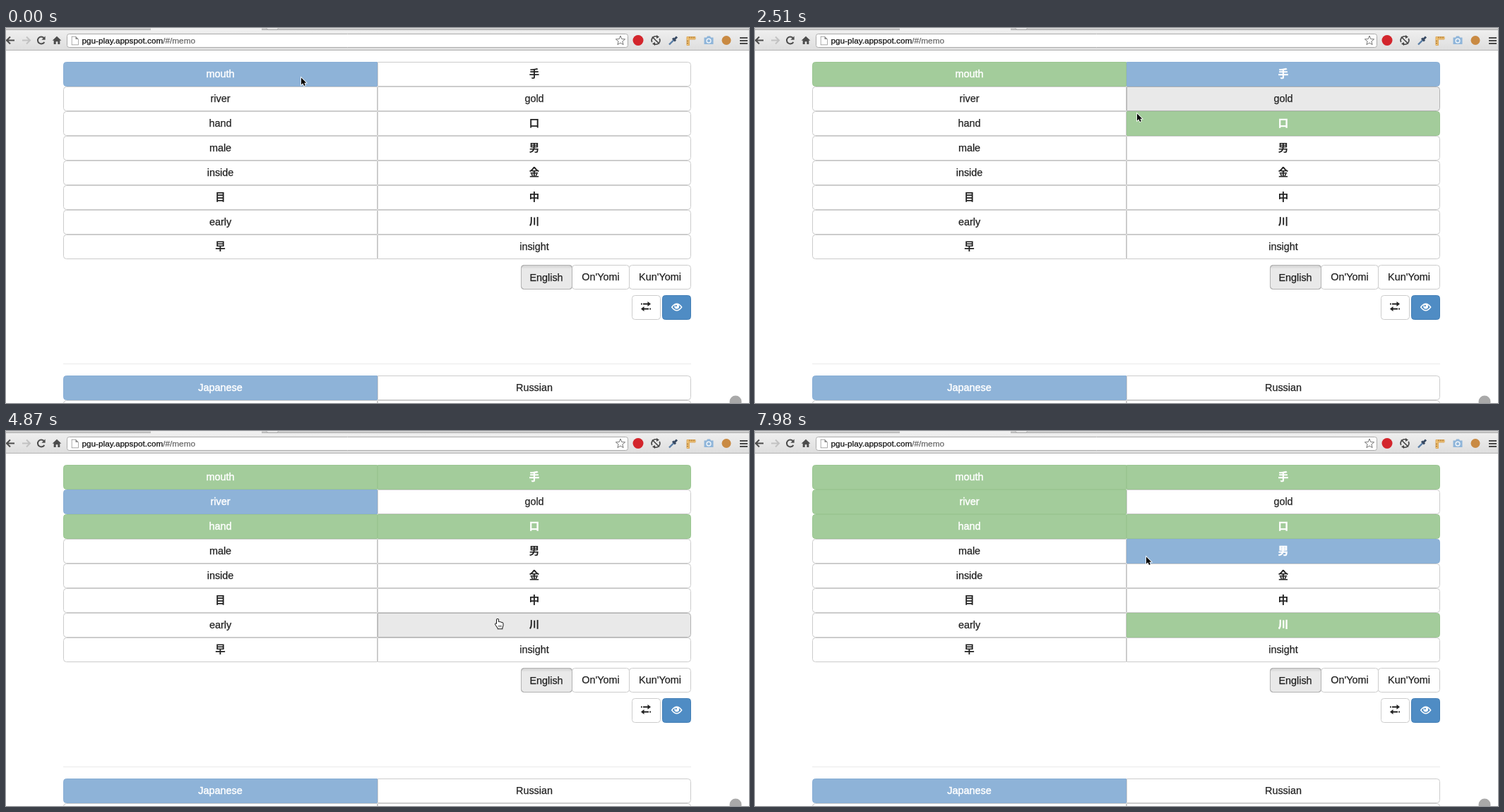
Recreate the animation shown at these times as an HTML page with a canvas. Size 1052 px wide and 532 px high, loop 8000 ms.

```html
<!DOCTYPE html>
<html lang="en">
<head>
<meta charset="utf-8">
<title>Memo</title>
<style>
html, body { margin: 0; width: 100%; height: 100%; overflow: hidden; background: #fff; }
canvas { display: block; width: 1052px; height: 532px; }
</style>
</head>
<body>
<canvas id="stage" width="1052" height="532"></canvas>
<script>
const ctx = document.getElementById('stage').getContext('2d');
const LOOP = 8000;
const SANS = '14.4px "Liberation Sans", Arial, sans-serif';
const KANJI = 'bold 14.4px "Noto Sans CJK JP", "Noto Sans CJK", sans-serif';
const INK = '#222';

// Cells 0-7 are the left column, 8-15 the right one.
const words = ['mouth', 'river', 'hand', 'male', 'inside', '目', 'early', '早',
               '手', 'gold', '口', '男', '金', '中', '川', 'insight'];
const pickedAt = { 0: 0, 8: 2210, 1: 4290, 11: 7550 };
const matchedAt = { 0: 880, 10: 880, 8: 3400, 2: 3400, 1: 5470, 14: 5470 };

// time, x, y, pointer shape, hovered cell
const moves = [
  [0, 418, 70, 'arrow'], [150, 446, 77, 'arrow'],
  [300, 575, 100, 'hand', 9], [440, 655, 142, 'hand', 10], [590, 674, 133, 'hand', 10],
  [1030, 677, 133, 'arrow'], [1620, 674, 113, 'hand'],
  [1770, 686, 86, 'hand', 9], [1920, 692, 64, 'hand', 8],
  [2360, 640, 92, 'hand', 9], [2510, 541, 121, 'arrow', 9],
  [2660, 498, 129, 'hand', 2], [2800, 466, 136, 'hand', 2], [2950, 452, 140, 'hand', 2],
  [3100, 444, 141, 'hand', 2], [3250, 441, 141, 'hand', 2],
  [3840, 446, 130, 'arrow'], [3990, 447, 111, 'hand', 1], [4140, 446, 104, 'hand', 1],
  [4430, 478, 110, 'arrow'], [4580, 560, 150, 'hand', 11],
  [4720, 650, 215, 'hand', 12], [4870, 692, 266, 'hand', 14],
  [5170, 705, 274, 'hand', 14], [5610, 708, 274, 'arrow'],
  [6060, 680, 254, 'hand', 13], [6210, 632, 237, 'hand', 13],
  [6360, 610, 218, 'hand', 12], [6500, 600, 205, 'hand', 12], [6650, 597, 200, 'hand', 12],
  [7250, 595, 178, 'hand', 11], [7400, 593, 168, 'hand', 11],
  [7690, 590, 169, 'arrow'], [7840, 577, 173, 'arrow'], [7980, 554, 178, 'arrow']
];

const looks = {
  plain: ['#fff', '#ccc', INK],
  hover: ['#e9e9e9', '#b2b2b2', INK],
  blue: ['#8eb3d8', '#8aafd5', '#fff'],
  green: ['#a3cc9b', '#9bc692', '#fff'],
  primary: ['#4f8cc4', '#447fb6', '#fff']
};

// Corner radii for the left and right halves of a pair, and for a lone button.
const LEFT = [4, 0, 0, 4], RIGHT = [0, 4, 4, 0], ALL = 4;

const handPath = new Path2D('M2.6 7V1.7C2.6 .2 4.9 .2 4.9 1.7V5.2C5.3 4.2 7.1 4.4 7.2 5.5' +
  'C7.7 4.7 9.3 5 9.4 6.2C10 5.5 11.6 6 11.6 7.3V9.4C11.6 11.4 10.4 12 10.4 14.4H4.4' +
  'C4.3 12.6 2.3 11.4 .8 8.6C.1 7.2 1.6 6.5 2.6 8.2Z');
const arrowPath = new Path2D('M0 0V11.4L2.7 8.9L4.5 13L6.6 12.1L4.8 8.1H8.2Z');

function box(x, y, w, h, r, fill, stroke) {
  ctx.beginPath();
  ctx.roundRect(x + .5, y + .5, w - 1, h - 1, r);
  ctx.fillStyle = fill;
  ctx.fill();
  ctx.lineWidth = 1;
  ctx.strokeStyle = stroke;
  ctx.stroke();
}

function bar(x, y, w, h, color) {
  ctx.fillStyle = color;
  ctx.fillRect(x, y, w, h);
}

function dot(x, y, r, color) {
  ctx.beginPath();
  ctx.arc(x, y, r, 0, 7);
  ctx.fillStyle = color;
  ctx.fill();
}

function shape(d, x, y, fill, stroke, width = 1, scale = 1) {
  const p = d instanceof Path2D ? d : new Path2D(d);
  ctx.save();
  ctx.translate(x, y);
  ctx.scale(scale, scale);
  ctx.lineWidth = width;
  if (stroke) { ctx.strokeStyle = stroke; ctx.stroke(p); }
  if (fill) { ctx.fillStyle = fill; ctx.fill(p); }
  ctx.restore();
}

// A hairline stroke gives the slightly heavier weight of smoothed type.
function type(text, x, y, color, weight) {
  ctx.fillStyle = ctx.strokeStyle = color;
  ctx.lineWidth = weight;
  ctx.fillText(text, x, y);
  ctx.strokeText(text, x, y);
}

function label(text, x, y, color) {
  const kanji = text.charCodeAt(0) > 255;
  ctx.font = kanji ? KANJI : SANS;
  ctx.textAlign = 'center';
  type(text, x, y, color, color === '#fff' ? .45 : kanji ? .05 : .25);
}

function button(text, x, y, w, look, radii = ALL) {
  const [fill, edge, ink] = looks[look];
  box(x, y, w, 35, radii, fill, edge);
  if (text) label(text, x + w / 2, y + 22, ink);
}

function drawToolbar() {
  const g = ctx.createLinearGradient(0, 3, 0, 31);
  g.addColorStop(0, '#efefef');
  g.addColorStop(1, '#dedede');
  bar(0, 0, 1052, 31, g);
  bar(0, 31, 1052, 1, '#b4b4b4');
  for (const [x, w] of [[0, 205], [362, 690]]) {
    bar(x, 0, w, 2, '#d0d0d0');
    bar(x, 2, w, 1, '#aaa');
  }
  shape('M0 0H19L17 3H4Z', 367, -1, '#e8e8e8', '#999');

  // navigation
  const ink = '#4c4c4c';
  shape('M6 -5L1 0L6 5M1 0H12', 0, 17.5, null, ink, 2);
  shape('M29 -5L34 0L29 5M34 0H23', 0, 17.5, null, '#c2c2c2', 2);
  shape('M4.3 2.4A5 5 0 1 1 3.6 -3.5', 50, 17.5, null, ink, 2);
  shape('M5.6 -6V-.8H.4Z', 50, 17.5, ink);
  shape('M0 -6.5L7 .2H4.8V6H1.5V2H-1.5V6H-4.8V.2H-7Z', 72, 17.5, ink, null, 1, .9);

  // address field
  box(86, 8, 795, 20, 3, '#fff', '#ababab');
  shape('M0 0H5L8.5 3.5V11H0ZM5 0V3.5H8.5', 93.5, 12.5, '#fff', '#888', 1.4);
  ctx.font = '11.75px "Liberation Sans", Arial, sans-serif';
  ctx.textAlign = 'left';
  const host = 'pgu-play.appspot.com';
  type(host, 107.5, 22, '#111', .25);
  type('/#/memo', 107.5 + ctx.measureText(host).width, 22, '#666', .25);

  // star
  ctx.beginPath();
  for (let i = 0; i < 10; i++) {
    const r = i % 2 ? 3 : 7, a = i * Math.PI / 5 - Math.PI / 2;
    ctx.lineTo(870 + r * Math.cos(a), 18 + r * Math.sin(a));
  }
  ctx.closePath();
  ctx.lineWidth = 1;
  ctx.strokeStyle = '#777';
  ctx.stroke();

  // tools
  dot(895, 17.5, 7.5, '#d3252c');
  shape('M-5.2 2.5A5.6 5.6 0 0 1 2 -5.2M5.2 -2.5A5.6 5.6 0 0 1 -2 5.2M-5 -5L5 5',
    920, 17.5, null, '#484848', 1.7);
  shape('M1 -7.5L5 -4.8L1 -2.5ZM-1 7.5L-5 4.8L-1 2.5Z', 920, 17.5, '#484848');
  shape('M-6 6L1.5 -1.5', 945, 17.5, null, '#5b7fa6', 2.4);
  shape('M-1 -3L3 1M1.5 -1.5L5 -5', 945, 17.5, null, '#384a63', 3);
  shape('M-6 -5H6V-1.5H-2.5V7H-6Z', 970, 17.5, '#eabb6d', '#d09a50');
  shape('M-2 -5V-3M1 -5V-3M4 -5V-3M-6 1H-4M-6 4H-4', 970, 17.5, null, '#98652c');
  shape('M-6.5 -4H-3L-2 -6H2L3 -4H6.5V5.5H-6.5Z', 995, 17.5, '#8fb5d9');
  dot(995, 18.2, 3.6, '#eef4fa');
  dot(995, 18.2, 2.1, '#8fb5d9');
  dot(1020, 17.5, 6.5, '#c98a43');
  for (const y of [13, 17, 21]) bar(1039, y, 11, 2, '#4a4a4a');
}

function drawControls() {
  button('', 729, 336, 73, 'hover');
  const g = ctx.createLinearGradient(0, 337, 0, 342);
  g.addColorStop(0, 'rgba(0,0,0,.1)');
  g.addColorStop(1, 'rgba(0,0,0,0)');
  bar(730, 337, 71, 5, g);
  label('English', 765, 359, INK);
  button("On'Yomi", 801, 336, 82, 'plain');
  button("Kun'Yomi", 882, 336, 88, 'plain');
  box(729, 336, 73, 35, ALL, 'transparent', '#b2b2b2');

  button('', 886, 379, 41, 'plain');
  shape('M-4 -3.5H3M-7 -3.5H-5.2M4 3.5H-3M7 3.5H5.2', 906, 395, null, INK, 2);
  shape('M2.5 -7L7 -3.5L2.5 0ZM-2.5 0L-7 3.5L-2.5 7Z', 906, 395, INK);

  button('', 929, 379, 41, 'primary');
  shape('M-7 0Q0 -9.5 7 0Q0 9.5 -7 0Z', 949.7, 396, null, '#fff', 1.4);
  dot(949.7, 395, 3.4, '#fff');
  dot(948.7, 394, 1.2, looks.primary[0]);

  bar(81, 476, 889, 1, '#eaeaea');
  button('Japanese', 81, 493, 445, 'blue', LEFT);
  button('Russian', 526, 493, 444, 'plain', RIGHT);
  button('', 81, 528, 445, 'plain', LEFT);
  button('', 526, 528, 444, 'plain', RIGHT);
  dot(1033, 530, 8.5, '#a9a9a9');
}

function lookOf(cell, t, hover) {
  if (t >= matchedAt[cell]) return 'green';
  if (t >= pickedAt[cell]) return 'blue';
  return cell === hover ? 'hover' : 'plain';
}

function drawCell(i, look) {
  const y = 48 + i % 8 * 35;
  if (i < 8) button(words[i], 81, y, 445, look, LEFT);
  else button(words[i], 526, y, 444, look, RIGHT);
}

function drawPointer(x, y, kind) {
  if (kind === 'hand') {
    shape(handPath, x + .5, y + .5, '#fff', '#111', 2, .95);
    shape('M5.5 9.5V12.5M7.3 9.5V12.5M9.1 9.5V12.5', x + .5, y + .5, null, '#333', .8, .95);
  } else {
    shape(arrowPath, x, y + .5, '#000', '#fff', 1.8, .88);
  }
}

function draw(t) {
  const [, x, y, kind, hover] = moves.findLast(m => m[0] <= t);
  bar(0, 0, 1052, 532, '#fff');
  drawToolbar();
  drawControls();
  words.forEach((_, i) => drawCell(i, lookOf(i, t, hover)));
  drawPointer(x, y, kind);
}

const start = performance.now();
function tick() {
  draw((performance.now() - start) % LOOP);
  requestAnimationFrame(tick);
}
tick();
</script>
</body>
</html>
```
